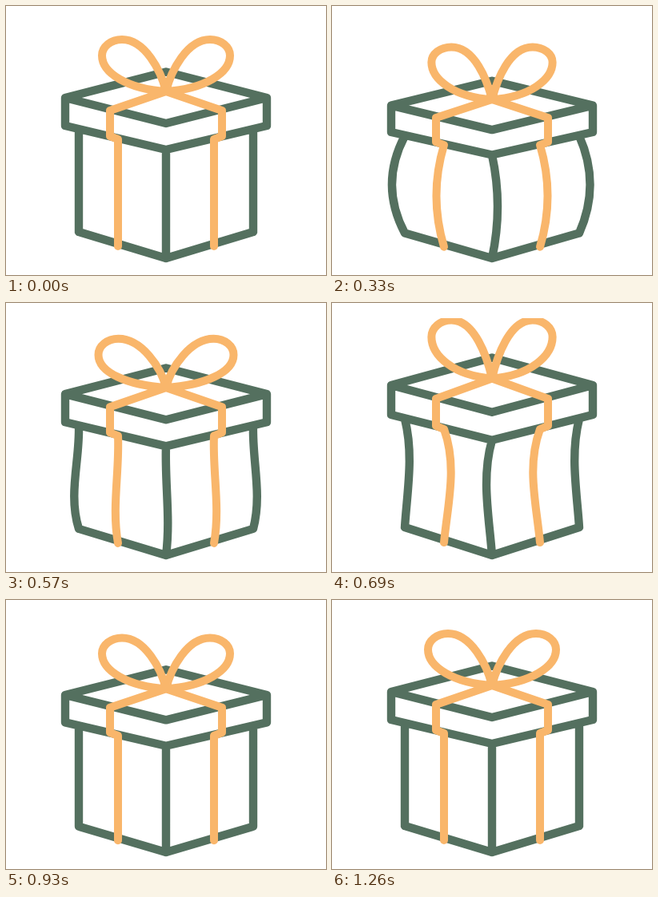
Animation, 400 px wide and 337 px high, one loop 3.32 s. Source, as an HTML page with a canvas:

```html
<!DOCTYPE html>
<html lang="en">
<head>
<meta charset="utf-8">
<title>Gift box</title>
<style>
html, body { margin: 0; width: 100%; height: 100%; overflow: hidden; background: #fff; }
canvas { display: block; width: 400px; height: 337px; }
</style>
</head>
<body>
<canvas id="stage"></canvas>
<script>
const LOOP = 3320, STEP = 30, FLOOR = 316;
const GREEN = '#54705f', ORANGE = '#f9b66b';

const canvas = document.getElementById('stage');
const ctx = canvas.getContext('2d');
const ratio = window.devicePixelRatio || 1;
canvas.width = 400 * ratio;
canvas.height = 337 * ratio;

const clamp = p => Math.min(1, Math.max(0, p));
const easeSine = p => (1 - Math.cos(Math.PI * clamp(p))) / 2;
const easeOut = p => 1 - (1 - clamp(p)) ** 3;

// Sine swing through turning points [time in ms, value], starting at 0
function swing(t, ...turns) {
  let from = 0, value = 0;
  for (const [to, goal] of turns) {
    value += (goal - value) * easeSine((t - from) / (to - from));
    if (t < to) break;
    from = to;
  }
  return value;
}

// Height of the box: squash, jump, settle
const stretch = t => 1 + swing(t, [420, -0.054], [720, 0.063], [930, -0.02], [1110, 0.008], [1260, 0]);

// Bow loops: -1 tall and narrow, 1 low and wide
const spread = t => swing(t, [310, -1], [570, 1], [700, -1], [930, 0]);

// Sides puff out quickly, then pull in from `turn` on
const flex = (t, turn, low) => t < turn
  ? 1.35 * easeOut(t / 420)
  : 1.35 + swing(t - turn, [250, low - 1.35], [930 - turn, -1.35]);

function draw(time) {
  const t = Math.floor(time % LOOP / STEP) * STEP;
  const s = stretch(t), k = spread(t);
  const upper = flex(t, 430, -1.15), lower = flex(t, 480, -0.4);
  const Y = y => FLOOR - (FLOOR - y) * s;

  const trace = (points, close) => {
    points.forEach(([x, y], i) => ctx[i ? 'lineTo' : 'moveTo'](x, Y(y)));
    if (close) ctx.closePath();
  };
  // Upright bending by `puff` when pressed and by `pinch` when pulled
  const upright = (x, y0, y1, puff, pinch) => {
    const h = (y1 - y0) / 3;
    const bend = v => x + v * (v > 0 ? puff : pinch);
    ctx.moveTo(x, Y(y0));
    ctx.bezierCurveTo(bend(upper), Y(y0 + h), bend(lower), Y(y1 - h), x, Y(y1));
  };
  const stroke = (color, width) => {
    ctx.strokeStyle = color;
    ctx.lineWidth = width;
    ctx.stroke();
  };

  ctx.setTransform(ratio, 0, 0, ratio, 0, 0);
  ctx.fillStyle = '#fff';
  ctx.fillRect(0, 0, 400, 337);
  ctx.save();
  ctx.beginPath();
  ctx.rect(0, 19, 400, 318);
  ctx.clip();
  ctx.lineJoin = ctx.lineCap = 'round';

  // Box and lid
  ctx.beginPath();
  trace([[91, 283], [200, FLOOR], [309, 283]]);
  upright(91, 155, 283, -16, -10);
  upright(309, 155, 283, 13.5, 10);
  upright(200, 180, FLOOR, 7, 12);
  trace([[74, 115], [200, 82.5], [326, 115], [200, 147]], true);
  trace([[74, 115], [74, 150], [200, 180], [326, 150], [326, 115]]);
  stroke(GREEN, 10.4);

  // Ribbon and bow
  ctx.beginPath();
  for (const side of [-1, 1]) {
    const X = x => 200 + side * x;
    const curve = (a, b, c, d, e, f) =>
      ctx.bezierCurveTo(X(a), Y(b), X(c), Y(d), X(e), Y(f));
    trace([[200, 107], [X(70), 131], [X(70), 163], [X(60), 167]]);
    upright(X(60), 167, 301, side * 9.5, side * 15);

    const w = 80 + 4.5 * k, top = 42 + 4 * k, mid = top + 20;
    ctx.moveTo(200, Y(107));
    curve(6, 82, w - 54, top, w - 25, top);
    curve(w - 11, top, w, top + 9, w, mid);
    curve(w, mid + 22, 48, 104, 0, 107);
  }
  stroke(ORANGE, 10);
  ctx.restore();
}

const start = performance.now();
function tick() {
  draw(performance.now() - start);
  requestAnimationFrame(tick);
}
tick();
</script>
</body>
</html>
```
